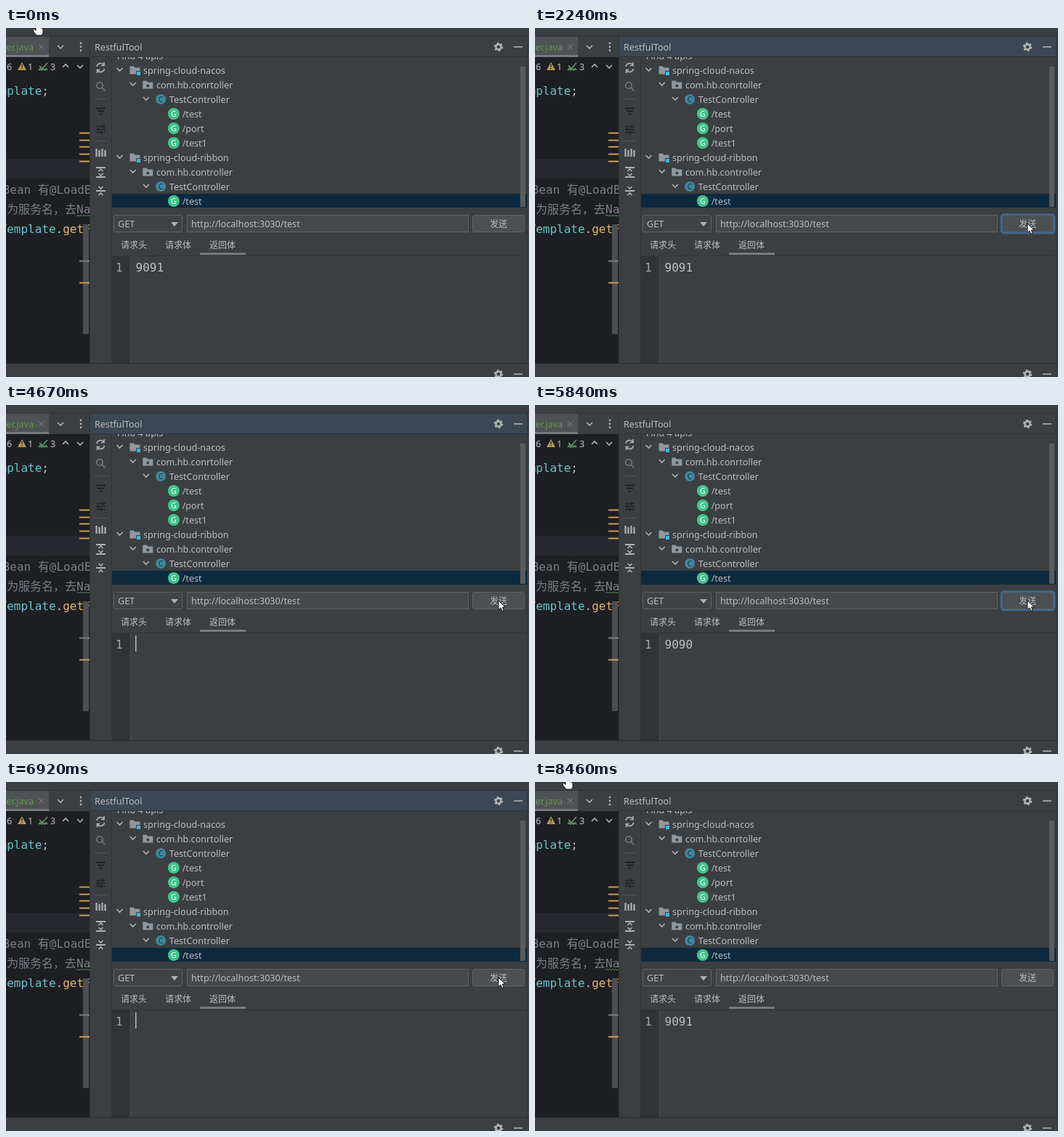
These frames come from a looping animation (720x480 px, 8640 ms). An HTML page:

```html
<!DOCTYPE html>
<html lang="zh">
<head>
<meta charset="utf-8">
<style>
html, body { margin: 0; width: 100%; height: 100%; overflow: hidden; background: #3c3f41; }
svg { display: block; width: 720px; height: 480px; }
text { white-space: pre; }
.ui { font: 12.6px "Noto Sans", "Noto Sans CJK SC", sans-serif; fill: #bbbdbf; }
.cn { font: 12px "Noto Sans CJK SC", sans-serif; fill: #bbbdbf; }
.code { font: 16px "DejaVu Sans Mono", "Noto Sans CJK SC", monospace; }
.line { fill: none; stroke: #afb1b3; stroke-width: 1.6; }
</style>
</head>
<body>
<svg id="stage" viewBox="0 0 720 480">
  <defs>
    <clipPath id="leftClip"><rect width="115" height="480"/></clipPath>
    <clipPath id="treeClip"><rect x="146" y="40" width="571" height="208"/></clipPath>
    <g id="gear">
      <circle r="3.6" fill="none" stroke="#afb1b3" stroke-width="2.6"/>
      <circle r="5.3" fill="none" stroke="#afb1b3" stroke-width="2" stroke-dasharray="2.6 2.95"/>
    </g>
    <path id="down" class="line" d="M-4-2 0 2 4-2"/>
  </defs>
  <rect width="720" height="480" fill="#3c3f41"/>
  <rect id="header" x="116" y="12" width="601" height="27"/>
  <path d="M0 11.5H720M116 39.5H717M717.5 12V462" stroke="#323436"/>

  <g clip-path="url(#leftClip)">
    <rect y="12" width="59" height="28" fill="#4e5254"/>
    <rect y="37" width="59" height="3" fill="#747a80"/>
    <text class="ui" x="38" y="30.5" text-anchor="end" style="fill:#629755">Controller.java</text>
    <path d="M45 22.500l7 7m0-7l-7 7" stroke="#7e8183"/>
    <use href="#down" x="75" y="26"/>
    <g fill="#afb1b3"><circle cx="103" cy="21" r="1.4"/><circle cx="103" cy="26" r="1.4"/><circle cx="103" cy="31" r="1.4"/></g>
    <rect y="40" width="115" height="422" fill="#1e1f22"/>
    <rect y="180" width="115" height="27" fill="#26282e"/>
    <g class="ui">
      <text x="1" y="57.500">6</text><text x="30" y="57.500">1</text><text x="61" y="57.500">3</text>
    </g>
    <path d="M22 47 28 58H16Z" fill="#b59a57"/><path d="M22 50v4m0 1v1.500" stroke="#1e1f22" stroke-width="1.3"/>
    <path d="M46 52l4 4 7-8M45 58l2-2 2 2 2-2 2 2 2-2 2 2" fill="none" stroke="#57965c" stroke-width="1.8"/>
    <path class="line" d="M78 54l4-4 4 4M98 51l4 4 4-4"/>
    <g class="code" fill="#7a7e85">
      <text x="59" y="92" text-anchor="end" fill="#66c3cc">restTemplate<tspan fill="#bcbec4">;</tspan></text>
      <text x="-4.400" y="227.500">Bean 有@LoadB</text>
      <text x="1" y="254.500">为服务名，去Na</text>
      <text x="-8.500" y="281.500" fill="#66c3cc">Template<tspan fill="#bcbec4">.</tspan><tspan fill="#e0b66c">getF</tspan></text>
    </g>
    <path d="M97 259l2-2 2 2 2-2 2 2 2-2 2 2 2-2 2 2 2-2" fill="none" stroke="#5a8a5f"/>
    <rect x="106" y="270" width="8" height="151" fill="#4d4e51"/>
    <path d="M101 144.500h14m-14 10h14m-14 9h14m-14 10h14m-14 10h14M101 350.500h14" stroke="#c3a052" stroke-width="2"/>
    <path d="M101 320.500h14" stroke="#7b7d80" stroke-width="2"/>
  </g>
  <path d="M115.500 12V462M145.500 40V462" stroke="#323436"/>

  <text class="ui" x="122" y="30.500">RestfulTool</text>
  <use href="#gear" x="678" y="26"/><path class="line" d="M699 26h12"/>

  <g class="line">
    <path d="M125 53a5.500 5.500 0 0 1 10-2M135 47v4.500h-4M135.500 56a5.500 5.500 0 0 1-10 2M125.500 62v-4.500h4"/>
    <g stroke="#77797b"><circle cx="129" cy="79" r="4.300"/><path d="M132 82l4.500 4.500"/></g>
    <path d="M121 97.500h18M121 155.500h18" stroke="#515355" stroke-width="1"/>
    <path d="M124 110.500h13M126 114.500h9M128.500 118.500h4" stroke="#17191a"/>
    <path d="M124 135.500h13M124 139.500h13M124 143.500h13M133 133v5M127 137v5M131 141v5" stroke="#202224" stroke-width="1.3"/>
    <path d="M124.500 166v11M128.500 168v9M132.500 166v11M136.500 168v9" stroke-width="2.200"/>
    <path d="M124 192h13M124 205h13" stroke-width="2"/><path d="M127.500 197l3-3 3 3M127.500 200l3 3 3-3"/>
    <path d="M124 224h13" stroke-width="2"/><path d="M127.500 218l3 3 3-3M127.500 230l3-3 3 3"/>
  </g>

  <g id="tree" clip-path="url(#treeClip)">
    <rect x="146" y="228" width="571" height="19" fill="#0d293e"/>
    <text class="ui" x="153" y="42.500">Find 4 apis</text>
  </g>
  <rect x="708" y="53" width="7" height="193" fill="#595b5d"/>

  <g stroke="#5f6263">
    <rect x="148.500" y="257.500" width="94" height="23" rx="2" fill="#3f4345"/>
    <rect x="249.500" y="257.500" width="387" height="23" fill="#45494a"/>
    <rect x="642.500" y="257.500" width="71" height="23" rx="2.500" fill="#4c5052"/>
  </g>
  <rect id="ring" x="642" y="256.500" width="73" height="25.500" rx="3.500" fill="none" stroke="#3f6896" stroke-width="2.600"/>
  <text class="ui" x="154" y="274">GET</text>
  <path d="M227 267h10l-5 6z" fill="#afb1b3"/>
  <text class="ui" x="255" y="273.500">http://localhost:3030/test</text>
  <text class="cn" x="678" y="274" text-anchor="middle">发送</text>
  <g class="cn"><text x="158" y="303">请求头</text><text x="219" y="303">请求体</text><text x="280" y="303">返回体</text></g>
  <rect x="267" y="309" width="63" height="3" fill="#747a80"/>
  <path d="M146 313.500H717" stroke="#323436"/>

  <rect x="146" y="314" width="25" height="147" fill="#313335"/>
  <path d="M171.500 314V461" stroke="#4d5052"/>
  <text class="code" x="151" y="334.500" fill="#a4a6a8">1</text>
  <text id="reply" class="code" x="178.500" y="334.500" fill="#bcc0c4"></text>
  <rect id="caret" x="178" y="317" width="1.500" height="22" fill="#bbbbbb"/>
  <path d="M0 461.500H720" stroke="#2b2d2f"/>
  <use href="#gear" x="678" y="476"/><path class="line" d="M699 476h12"/>

  <path id="arrow" d="M0 0V12.500L3 9.800 5 14.300 7.200 13.300 5.200 9H9Z" fill="#fff" stroke="#111" stroke-width=".9"/>
  <path id="hand" d="M-1 0q1.500-1.500 3 0v6l5 1q2 .6 2 3v4l-2 3H0l-4-5-1-3q1-1.500 3 .5l1 1Z" fill="#fff" stroke="#111" stroke-width=".9"/>
</svg>
<script>
const LOOP = 8640;
const $ = id => document.getElementById(id);

// Project tree: depth, icon, label
const rows = [
  [0, 'module', 'spring-cloud-nacos'],
  [1, 'pack', 'com.hb.conrtoller'],
  [2, 'C', 'TestController'],
  [3, 'G', '/test'],
  [3, 'G', '/port'],
  [3, 'G', '/test1'],
  [0, 'module', 'spring-cloud-ribbon'],
  [1, 'pack', 'com.hb.controller'],
  [2, 'C', 'TestController'],
  [3, 'G', '/test']
];

const badge = (x, r, fill, ink, letter) =>
  `<circle cx="${x}" r="${r}" fill="${fill}"/><text x="${x}" y="4" text-anchor="middle"
    style="font:10.5px 'Noto Sans',sans-serif" fill="${ink}">${letter}</text>`;

const folder = x => `<path d="M${x - 7}-5.500h5l2 2h7v9h-14z" fill="#8f989e"/>`;

const icons = {
  module: x => folder(x) + `<rect x="${x + 1.5}" y="1" width="6.500" height="6.500" fill="#3c3f41"/>
    <rect x="${x + 2.5}" y="2" width="5" height="5" fill="#40b6e0"/>`,
  pack: x => folder(x) + `<circle cx="${x}" cy="1.500" r="2" fill="#3c3f41"/>`,
  C: x => badge(x, 7, '#3e86a0', '#1f3540', 'C'),
  G: x => badge(x, 8, '#3fc58c', '#fff', 'G')
};

$('tree').insertAdjacentHTML('beforeend', rows.map(([depth, icon, label], i) => {
  const x = 177.500 + depth * 17.800;
  const chevron = depth < 3 ? `<use href="#down" x="${156.500 + depth * 18.200}" y="-1"/>` : '';
  return `<g transform="translate(0 ${58 + i * 20})">${chevron}${icons[icon](x)}
    <text class="ui" x="${189 + depth * 17.900}" y="4.500">${label}</text></g>`;
}).join(''));

// Panel states: start time, flags (r = ring, b = blue header, c = caret), reply
const states = [
  [0, '', 9091],
  [1350, 'rb', 9091], [1430, 'b', 9091], [1520, '', 9091],
  [2070, 'r', 9091], [2160, 'rb', 9091], [2250, 'b', 9091], [2330, '', 9090],
  [3050, 'bc', ''], [3160, '', 9090],
  [3960, 'rb', 9090], [4050, '', 9091],
  [4670, 'bc', ''], [4760, 'b', 9091], [4850, '', 9091],
  [5390, 'bc', ''], [5480, '', 9090],
  [5840, 'r', 9090], [5950, 'bc', ''], [6040, '', 9091],
  [6380, 'r', 9091], [6470, 'bc', ''], [6570, '', 9091],
  [6830, 'r', 9091], [6920, 'bc', ''], [7010, '', 9090],
  [7390, 'rb', 9090], [7480, '', 9091]
];

// Pointer legs: start, end, steps, from, to
const home = [42, -7], value = [202, 320], send = [678, 269];
const legs = [
  [90, 445, 5, home, value],
  [535, 980, 6, value, send],
  [7570, 8190, 8, send, value],
  [8270, 8460, 3, value, [43, -7]]
];

function pointerAt(t) {
  let pos = home;
  for (const [start, end, steps, a, b] of legs) {
    if (t < start) break;
    const gap = (end - start) / (steps - 1);
    const p = Math.min(1, (Math.floor((t - start) / gap + 1e-6) + 1) / steps);
    pos = a.map((v, i) => v + (b[i] - v) * p);
  }
  return pos;
}

const show = (id, on) => $(id).setAttribute('visibility', on ? 'visible' : 'hidden');

function draw(t) {
  const [, flags, reply] = states.findLast(s => s[0] <= t);
  show('ring', flags.includes('r'));
  show('caret', flags.includes('c'));
  $('header').setAttribute('fill', flags.includes('b') ? '#3b4754' : '#3c3f41');
  $('reply').textContent = reply;

  const [x, y] = pointerAt(t);
  const onTab = y < 0;
  show('hand', onTab);
  show('arrow', !onTab);
  $(onTab ? 'hand' : 'arrow').setAttribute('transform', `translate(${x} ${y})`);
}

const begin = performance.now();
function tick() {
  draw((performance.now() - begin) % LOOP);
  requestAnimationFrame(tick);
}
tick();
</script>
</body>
</html>
```
